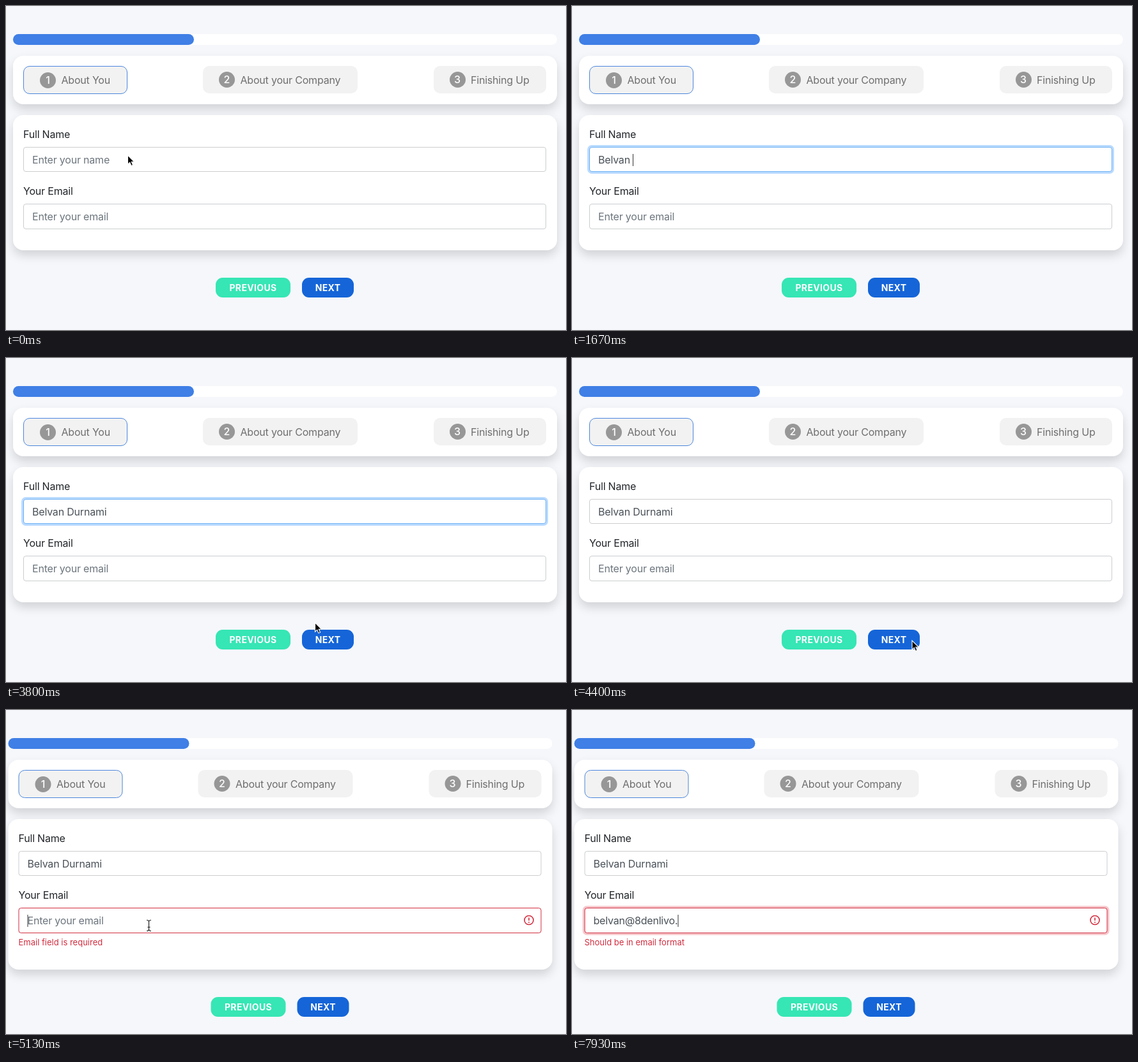
Recreate the animation shown at these times as an HTML page. Size 876 px wide and 508 px high, loop 8000 ms.

```html
<!DOCTYPE html>
<html lang="en">
<head>
<meta charset="utf-8">
<title>Form wizard</title>
<style>
  html, body { margin: 0; width: 100%; height: 100%; overflow: hidden; background: #f5f7fb; }
  body { position: relative; font: 16px/20px Inter, "Open Sans", sans-serif; letter-spacing: -.2px; color: #212529; }
  #page { position: absolute; left: 0; top: 0; width: 876px; height: 508px; }
  #page > *, #pointer { position: absolute; box-sizing: border-box; white-space: pre; }
  .bar { left: 10.5px; top: 44px; width: 851px; height: 17px; border-radius: 8.5px; background: #fff; }
  .bar.done { width: 283.7px; background: #3f7fe6; }
  .card { left: 10.5px; width: 851px; border-radius: 16px; background: #fff; box-shadow: 0 8px 16px rgba(0, 0, 0, .15); }
  .step { top: 94px; height: 43px; padding-left: 25px; border-radius: 10px; background: #f2f2f2; color: #6e6e6e;
    display: flex; align-items: center; gap: 8.5px; }
  .step.active { height: 44px; border: 1px solid #4b86dc; }
  .step b { width: 25px; height: 25px; border-radius: 50%; background: #979797; color: #fff;
    font-weight: 500; line-height: 25px; text-align: center; letter-spacing: 0; }
  .label { left: 27px; }
  .field { --tint: 0; --ring: 0; left: 27px; width: 818px; height: 39.5px; padding-left: 13px; border-radius: 4px;
    background: #fff; color: #495057; line-height: 38px;
    border: 1px solid color-mix(in srgb, var(--accent) calc(var(--tint) * 100%), #cbcdd0);
    box-shadow: 0 0 0 3px rgb(var(--glow) / calc(var(--ring) * .27)); }
  .hint { color: #6c757d; }
  .caret { display: inline-block; width: 1px; height: 19px; margin-right: -1px; background: #333; vertical-align: -4px; }
  .error { font-size: 13px; letter-spacing: 0; color: #d12d3f; }
  .button { height: 31px; border-radius: 11px; color: #fff; font-weight: 700; font-size: 14px; line-height: 31px;
    letter-spacing: .35px; text-align: center; }
  #pointer { left: 0; top: 0; overflow: visible; }
</style>
</head>
<body>
<div id="page">
  <div class="bar"></div>
  <div class="bar done"></div>

  <div class="card" style="top:78px;height:76px"></div>
  <div class="step active" style="left:27px;width:163px"><b>1</b>About You</div>
  <div class="step" style="left:308px;width:242px"><b>2</b>About your Company</div>
  <div class="step" style="left:668.5px;width:176.5px"><b>3</b>Finishing Up</div>

  <div class="card" id="form" style="top:171px"></div>
  <div class="label" style="top:190.5px">Full Name</div>
  <div class="field" id="name" style="top:220.5px;--accent:#6fb1f5;--glow:0 123 255"><span class="caret"></span><span class="text"></span></div>
  <div class="label" style="top:279.5px">Your Email</div>
  <div class="field" id="email" style="top:310px;--accent:#d12d3f;--glow:220 53 69"><span class="caret"></span><span class="text"></span></div>

  <svg id="alert" style="left:817px;top:321px" width="17" height="17" fill="none" stroke="#d12d3f" stroke-width="1.6">
    <circle cx="8.5" cy="8.5" r="7"/>
    <path d="M8.5 4.5V9.2M8.5 11V12.8"/>
  </svg>
  <div class="error label" id="error" style="top:353.5px"></div>

  <div class="button" id="previous" style="left:328px;width:117px;background:#36e6b4">PREVIOUS</div>
  <div class="button" id="next" style="left:463px;width:81px;background:#1565d8">NEXT</div>
</div>

<svg id="pointer" width="20" height="20">
  <path id="arrow" d="M0 0V14.2L3.2 11.2 5.5 16.4 8 15.3 5.8 10.3H10.2Z" fill="#000" stroke="#fff" stroke-width="1.1"/>
  <path id="ibeam" d="M-3.5 -8.5Q0 -8.5 0 -6V6Q0 8.5 -3.5 8.5M3.5 -8.5Q0 -8.5 0 -6V6Q0 8.5 3.5 8.5M-2 2.5H2" fill="none" stroke="#222" stroke-width="1.2"/>
</svg>

<script>
const LOOP = 8000;
const el = id => document.getElementById(id);
const clamp = v => Math.min(1, Math.max(0, v));
const ramp = (t, from, to) => clamp((t - from) / (to - from));
const within = (t, spans) => spans.some(([from, to]) => t >= from && t < to);

const nameField = {
  box: el('name'), hint: 'Enter your name', value: 'Belvan Durnami',
  keys: [930, 1130, 1200, 1270, 1400, 1470, 1670, 1870, 1930, 2070, 2130, 2200, 2270, 2330],
  caret: [[270, 670], [930, 2730], [3130, 3530], [3930, 4070]]
};
const emailField = {
  box: el('email'), hint: 'Enter your email', value: 'belvan@8denlivo.',
  keys: [5800, 5870, 6000, 6070, 6130, 6200, 6530, 6730, 6930, 7000, 7200, 7270, 7470, 7530, 7730, 7930],
  caret: [[5130, 5530], [5800, LOOP]]
};

// Pointer stops: time, x, y
const stops = [
  [0, 190.5, 234], [70, 188, 243], [130, 187.5, 244], [3130, 187.5, 244], [3330, 235, 276], [3600, 385, 358],
  [3800, 483.5, 415], [3870, 520, 436], [3930, 544, 443], [4070, 532, 443], [4730, 532, 443], [4800, 522, 449],
  [5000, 270, 356], [5070, 223.5, 338]
];

function pointerAt(t) {
  const i = stops.findIndex(s => s[0] > t);
  if (i < 0) return stops.at(-1).slice(1);
  const [a, b] = [stops[i - 1], stops[i]];
  const p = ramp(t, a[0], b[0]);
  return [a[1] + (b[1] - a[1]) * p, a[2] + (b[2] - a[2]) * p];
}

function drawField(field, t, tint, ring) {
  const { box, hint, value, keys, caret } = field;
  const typed = value.slice(0, keys.filter(k => k <= t).length);
  const text = box.querySelector('.text');
  const bar = box.querySelector('.caret');
  text.textContent = typed || hint;
  text.classList.toggle('hint', !typed);
  box.insertBefore(bar, typed ? null : text);
  bar.style.visibility = within(t, caret) ? 'visible' : 'hidden';
  box.style.setProperty('--tint', tint);
  box.style.setProperty('--ring', ring);
}

function drawPointer(t) {
  const [x, y] = pointerAt(t);
  const overField = t > 0 && ((y > 220 && y < 260) || (y > 310 && y < 349));
  el('pointer').style.transform = `translate(${x}px, ${y}px)`;
  el('pointer').style.display = within(t, [[930, 3130], [5800, LOOP]]) ? 'none' : '';
  el('arrow').style.display = overField ? 'none' : '';
  el('ibeam').style.display = overField ? '' : 'none';
}

function render(t) {
  const invalid = t >= 4470;
  const grow = invalid ? 24 : 0;
  el('page').style.transform = invalid ? 'translateX(-7.5px)' : 'none';
  el('form').style.height = 212 + grow + 'px';
  el('previous').style.top = el('next').style.top = 425.5 + grow + 'px';
  el('alert').style.display = invalid ? '' : 'none';
  el('error').textContent = !invalid ? '' : t < 5800 ? 'Email field is required' : 'Should be in email format';

  const nameFocus = ramp(t, 200, 400) - ramp(t, 4000, 4200);
  drawField(nameField, t, nameFocus, nameFocus);
  drawField(emailField, t, ramp(t, 4400, 4530), ramp(t, 5130, 5270));
  drawPointer(t);
}

// The picture advances 15 times a second, on times rounded to 10 ms.
function tick() {
  const step = Math.min(119, Math.floor(performance.now() % LOOP * .015 + .06));
  render(Math.round(step / .15) * 10);
  requestAnimationFrame(tick);
}
tick();
</script>
</body>
</html>
```
